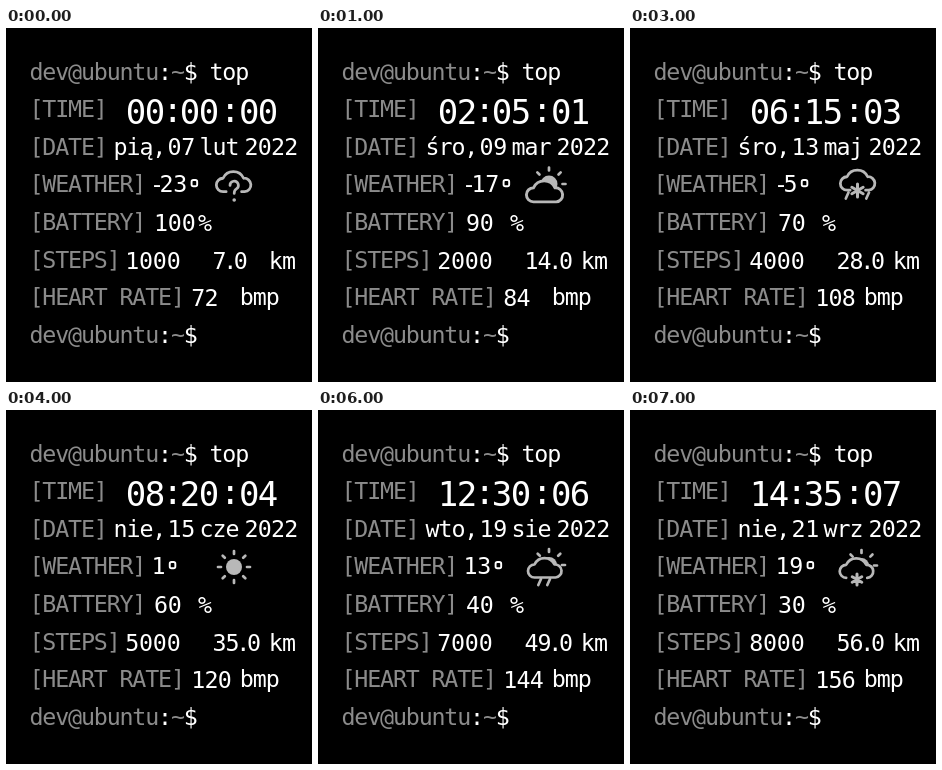
These frames come from a looping animation (306x354 px, 8000 ms). An HTML page:

```html
<!DOCTYPE html>
<html lang="pl">
<head>
<meta charset="utf-8">
<title>Terminal watch face</title>
<style>
  html, body { margin: 0; width: 100%; height: 100%; overflow: hidden; background: #000; }
  svg { display: block; width: 306px; height: 354px; }
  text { font: 23.3px "DejaVu Sans Mono", monospace; letter-spacing: -.2px; fill: #fff; white-space: pre; }
  .label { letter-spacing: -1.17px; }
  .dim { fill: #8b8b8b; }
  .clock { font-size: 34px; letter-spacing: -1.6px; }
  .tight { letter-spacing: -1.1px; }
  .mid { letter-spacing: -.8px; }
  .icon { fill: none; stroke: #b8b8b8; stroke-width: 2.7; stroke-linecap: round; stroke-linejoin: round; }
  .icon .solid { fill: #b8b8b8; }
  .icon .front { fill: #000; }
</style>
</head>
<body>
<svg id="face" viewBox="0 0 306 354"></svg>
<script>
const face = document.getElementById('face');
const STEP = 1000, COUNT = 8;
const DAYS = ['nie', 'pon', 'wto', 'śro', 'czw', 'pią', 'sob'];
const MONTHS = ['lut', 'mar', 'kwi', 'maj', 'cze', 'lip', 'sie', 'wrz'];

const pad = n => String(n).padStart(2, '0');
const row = n => 51.6 + 37.6 * n;
const text = (x, y, s, cls = '') => `<text x="${x}" y="${y}" class="${cls}">${s}</text>`;
const path = (d, extra = '') => `<path d="${d}" ${extra}/>`;
const at = (x, y, s, k = 1) => `<g transform="translate(${x} ${y}) scale(${k})">${s}</g>`;

const ARCH = 'A6.5 6.5 0 0 1 8 8A11 11 0 0 1 28 8A6.5 6.5 0 0 1 29 21';
const cloud = cls => path(`M8 21${ARCH}Z`, `class="${cls}"`);
const openCloud = path(`M11 21H8${ARCH}H26`);

function rays(x, y, from, to, inner, outer) {
  let d = '';
  for (let a = from; a <= to; a += 45) {
    const c = Math.cos(a * Math.PI / 180), s = Math.sin(a * Math.PI / 180);
    d += `M${x + c * inner} ${y + s * inner}L${x + c * outer} ${y + s * outer}`;
  }
  return path(d);
}
const sun = (x, y, r, from, to) =>
  `<circle cx="${x}" cy="${y}" r="${r}" class="solid" stroke="none"/>` + rays(x, y, from, to, r + 5, r + 8);
const flake = (x, y, r) => {
  let d = '';
  for (let k = 0; k < 3; k++) {
    const a = Math.PI * (k / 3 + .5), c = r * Math.cos(a), s = r * Math.sin(a);
    d += `M${x - c} ${y - s}L${x + c} ${y + s}`;
  }
  return path(d, 'stroke-width="3"');
};
const drop = (x, y, len) => path(`M${x} ${y}l${-len * .45} ${len}`);

const ICONS = [
  at(208.8, 142, openCloud, 1.03) +
    path('M224 157.5a4.2 4.2 0 1 1 6.4 3.4q-2.2 1.3 -2.2 4.6') +
    '<circle cx="228.2" cy="172" r="1" class="solid" stroke-width="1.6"/>',
  sun(231, 156, 8.5, -135, 0) + at(206.8, 151.2, cloud('front'), 1.08),
  at(208.8, 140.5, cloud(''), 1.03) + drop(223, 166.5, 7) + drop(234, 166.5, 7),
  at(208.8, 140.5, openCloud, 1.03) + flake(227.5, 162.5, 6.5) + drop(218.5, 164.5, 6) + drop(239, 164.5, 6),
  sun(228, 157, 8, 0, 315),
  at(209.2, 144, cloud('solid'), 1.02) + at(209.5, 151, cloud('front'), .98),
  sun(231, 155, 8, -135, 0) + at(208.5, 146.5, cloud('front'), 1) + drop(223, 169, 6) + drop(232, 169, 6),
  sun(231.5, 155.5, 7.5, -135, 0) + at(208.2, 146.8, path(`M8 21${ARCH}`, 'class="front"')) + flake(227, 169.5, 5.5)
];

function temperature(t) {
  const x = t < 0 ? 153.5 : 145.5, s = String(Math.abs(t));
  const ring = x + s.length * 13.84 + 7.2;
  return (t < 0 ? text(144, row(3) - .6, '-') : '') + text(x, row(3), s) +
    `<rect x="${ring - 2.8}" y="152" width="5.6" height="6.2" rx="1.8" fill="none" stroke="#fff" stroke-width="1.9"/>`;
}

function values(i) {
  const date = 7 + 2 * i;
  // The weekday follows the zero-based month.
  const day = DAYS[new Date(2022, i, date).getDay()];
  const km = 7 * (i + 1);
  return text(119.8, 96.2, pad(2 * i), 'clock') +
    text(173.8, 96.2, pad(5 * i), 'clock') +
    text(233, 96.2, pad(i), 'clock') +
    text(107.6, row(2), day + ',', 'tight') +
    text(161.4, row(2) + .4, pad(date)) +
    text(193.6, row(2) + .4, MONTHS[i], 'tight') +
    temperature(-23 + 6 * i) +
    `<g class="icon">${ICONS[i]}</g>` +
    text(148, row(4) + .8, 100 - 10 * i) +
    text(119.2, row(5) + 1, 1000 * (i + 1)) +
    text(206.4, row(5) + 1, `${km}<tspan dx="-2.5">.</tspan><tspan dx="-2.5">0</tspan>`, 'mid') +
    text(185.2, row(6) + .4, 72 + 12 * i, 'mid');
}

const dim = s => `<tspan class="dim">${s}</tspan>`;
const prompt = dim('dev@ubuntu') + ':' + dim('~') + '$';
const labels = ['TIME', 'DATE', 'WEATHER', 'BATTERY', 'STEPS', 'HEART RATE'];

face.innerHTML =
  text(23.5, row(0), prompt + ' top', 'label') +
  labels.map((s, n) => text(23.5, row(n + 1), `[${s}]`, 'label dim')).join('') +
  text(23.5, row(7), prompt, 'label') +
  text(156.6, 93.6, ':', 'clock') +
  text(214, 93.6, ':', 'clock') +
  text(238.6, row(2) + .4, '2022', 'mid') +
  text(192, row(4) + .8, '%') +
  text(262.8, row(5) + 1, 'km', 'mid') +
  text(233.8, row(6) - .4, 'bmp', 'tight') +
  '<g id="live"></g>';

const live = document.getElementById('live');
let shown = -1;
function draw() {
  const i = Math.floor(performance.now() / STEP) % COUNT;
  if (i !== shown) live.innerHTML = values(shown = i);
  requestAnimationFrame(draw);
}
draw();
</script>
</body>
</html>
```
